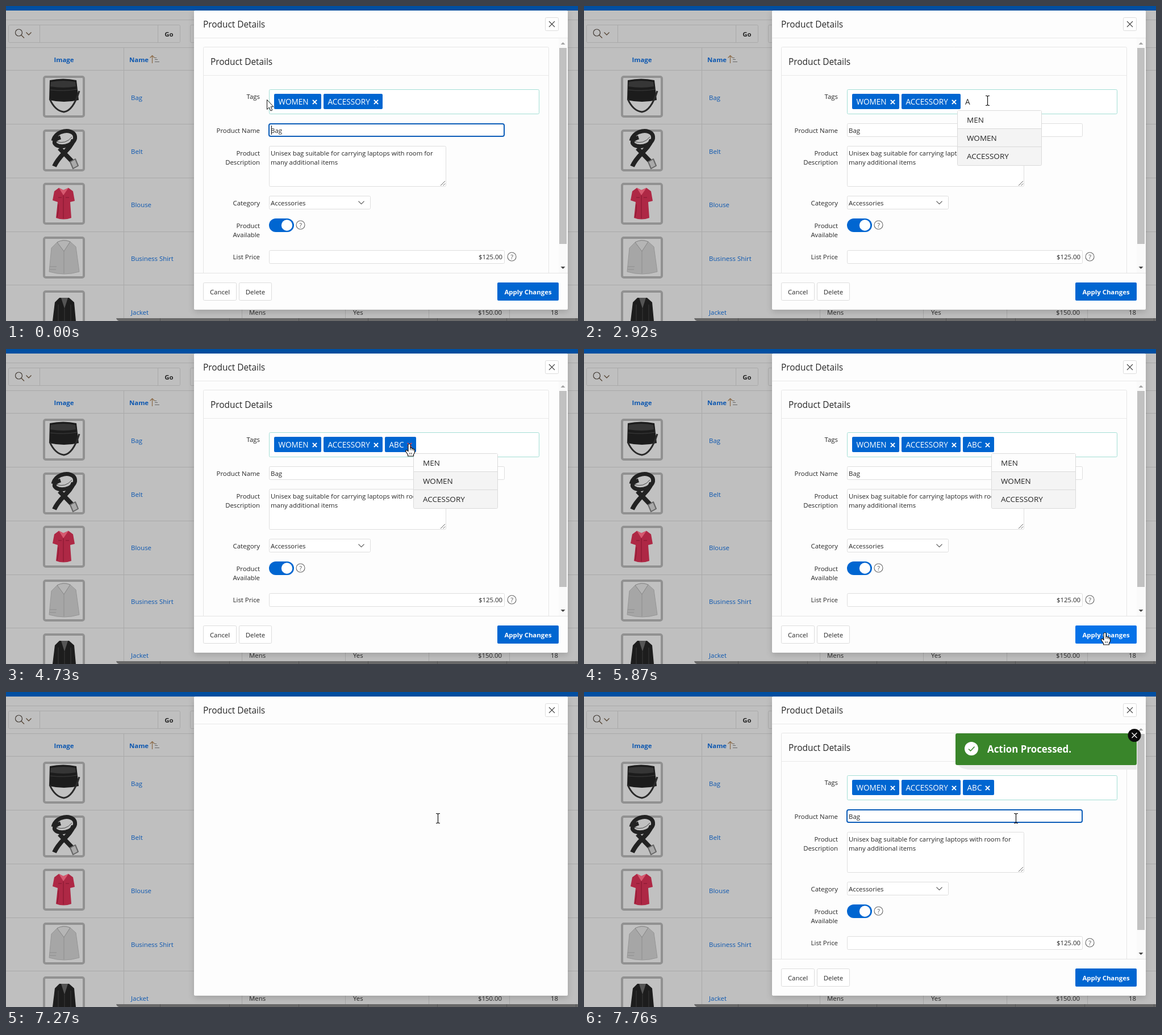
Write an HTML page with a canvas that moves like this. It is 1007x556 px and loops after 8 s.

```html
<!DOCTYPE html>
<html lang="en">
<head>
<meta charset="utf-8">
<title>Product Details</title>
<style>
html, body { margin: 0; width: 100%; height: 100%; overflow: hidden; background: #bfbfbf; }
canvas { display: block; }
</style>
</head>
<body>
<canvas id="stage" width="1007" height="556"></canvas>
<script>
const ctx = document.getElementById('stage').getContext('2d');
const LOOP = 8000;
const BLUE = '#0066d1', INK = '#262626', LINK = '#0c57b0', RULE = '#a9a9a9', PAPER = '#fdfdfd';
const TAGS = [
  { text: 'WOMEN', x: 472, w: 83 },
  { text: 'ACCESSORY', x: 559, w: 104 },
  { text: 'ABC', x: 667, w: 55 }
];

// Helpers
function label(s, x, y, { size = 11.4, weight = 400, color = INK, align = 'left' } = {}) {
  ctx.font = `${weight} ${size}px "Open Sans", "Noto Sans", sans-serif`;
  ctx.fillStyle = color;
  ctx.textAlign = align;
  ctx.fillText(s, x, y);
}

function rect(x, y, w, h, color) {
  ctx.fillStyle = color;
  ctx.fillRect(x, y, w, h);
}

function box(x, y, w, h, fill, stroke, r = 2, line = 1) {
  ctx.beginPath();
  const i = stroke ? line / 2 : 0;
  ctx.roundRect(x + i, y + i, w - 2 * i, h - 2 * i, r);
  if (fill) { ctx.fillStyle = fill; ctx.fill(); }
  if (stroke) { ctx.strokeStyle = stroke; ctx.lineWidth = line; ctx.stroke(); }
}

function path(d, fill, stroke, line = 1, x = 0, y = 0) {
  const p = new Path2D(d);
  ctx.save();
  ctx.translate(x, y);
  ctx.lineJoin = 'round';
  if (fill) { ctx.fillStyle = fill; ctx.fill(p); }
  if (stroke) { ctx.strokeStyle = stroke; ctx.lineWidth = line; ctx.stroke(p); }
  ctx.restore();
}

function disc(x, y, r, fill, stroke, line = 1) {
  ctx.beginPath();
  ctx.arc(x, y, r, 0, 2 * Math.PI);
  if (fill) { ctx.fillStyle = fill; ctx.fill(); }
  if (stroke) { ctx.strokeStyle = stroke; ctx.lineWidth = line; ctx.stroke(); }
}

function cross(x, y, r, color, line) {
  path(`M${-r} ${-r}L${r} ${r}M${r} ${-r}L${-r} ${r}`, null, color, line, x, y);
}

// Dimmed page behind the dialog
const thumbs = {
  bag() {
    path('M77 131Q101 126 124 131L128 166Q102 172 76 166Z', '#1c1c1c');
    path('M79 134Q101 130 122 134L123 142Q101 146 78 142Z', '#363636');
    path('M78 148Q102 151 125 147', null, '#3f3f3f', 1);
    path('M77 164Q86 185 102 187Q118 185 129 150', null, '#2a2a2a', 3);
  },
  belt() {
    path('M83 238C88 218 116 216 121 228C126 243 100 253 88 245C82 241 86 235 96 232', null, '#222', 7);
    path('M119 236C113 254 94 262 85 283M94 251L119 277', null, '#222', 8);
    path('M88 239Q105 245 116 231', null, '#4a4a4a', 1);
    path('M113 275L122 270L127 282L118 287Z', '#aaa', '#666', 2);
  },
  blouse() {
    path('M93 321L101 325L110 321L118 327L121 344L113 346L115 374Q101 379 88 374L91 346L82 343L85 327Z', '#ae2845');
    path('M93 321L101 334L110 321L101 325Z', '#d65a70');
    path('M101 334V375M92 338H98M105 338H111M92 350Q93 362 90 373', null, '#81172f', 1);
  },
  shirt() {
    path('M90 417Q101 411 113 416L123 425L129 469Q103 477 76 469L80 427Z', '#a6a6a6', '#969696', 1);
    path('M90 417L102 433L113 416Q101 411 90 417Z', '#b5b5b5', '#858585', 1);
    path('M102 433V472M77 460H89M77 465H88', null, '#8d8d8d', 1);
  },
  jacket() {
    path('M94 515H111L120 523L123 556H82L86 523Z', '#1d1d1d');
    path('M97 515L103 534L109 515Z', '#555');
    path('M92 527V556M103 534V556M114 527V556', null, '#3a3a3a', 1);
  }
};

function drawPage() {
  rect(0, 0, 1007, 556, '#bfbfbf');
  rect(0, 0, 1007, 8, '#004fa1');
  for (const y of [24, 73, 113, 208, 303, 398, 492]) rect(0, y, 1007, 1, RULE);
  rect(207, 73, 1, 483, RULE);
  for (const x of [415, 597, 744, 886]) rect(x, 114, 1, 442, RULE);

  box(4, 33, 303, 32, null, RULE);
  rect(59, 33, 1, 32, RULE);
  rect(267, 33, 1, 32, RULE);
  box(324, 33, 60, 32, null, RULE);
  disc(22.5, 47, 6, null, '#443d37', 1.2);
  path('M27 51.5L32 56.5M35.5 46.5L40 51L44.5 46.5', null, '#574635', 1.3);
  label('Go', 287, 54, { weight: 700, align: 'center' });

  label('Image', 102, 99, { weight: 700, color: LINK, align: 'center' });
  label('Name', 217, 99, { weight: 700, color: LINK });
  path('M257.5 101V87.5M253.5 91.5L257.5 87.5L261.5 91.5', null, '#8b6a46', 1.2);
  path('M262 91.5H265M262 94.5H267M262 98.5H270', null, '#666', 1);

  ['Bag', 'Belt', 'Blouse', 'Business Shirt', 'Jacket'].forEach((name, i) => {
    const top = Math.round(123 + 94.7 * i);
    box(65, top, 74, 74, '#c1c1c1', '#919191', 3, 4);
    label(name, 220, top + 43, { color: LINK });
  });
  Object.values(thumbs).forEach(draw => draw());

  label('Mens', 428, 545);
  label('Yes', 611, 545);
  label('$150.00', 873, 545, { align: 'right' });
  label('18', 972, 545, { align: 'right' });
  path('M194 551H1007V556H199Q195 555 194 551Z', '#696969');
  for (let x = 271; x < 1007; x += 122) rect(x, 551, 1, 5, '#555');
}

// Dialog
function drawShell() {
  ctx.save();
  ctx.shadowColor = 'rgba(0,0,0,.16)';
  ctx.shadowBlur = 12;
  ctx.shadowOffsetY = 4;
  box(331, 8, 658, 528, PAPER);
  ctx.restore();
  label('Product Details', 347, 38, { size: 15.4, weight: 500 });
  rect(331, 56, 658, 1, '#e9e9e9');
  box(949, 20, 24, 24, '#fff', '#dcdcdc');
  cross(961, 32, 5, '#444', 1.1);
}

function help(x, y) {
  disc(x, y, 7.5, null, '#666', 1.1);
  label('?', x, y + 4, { size: 11, color: '#555', align: 'center' });
}

function drawTag({ text, x, w }, hovered) {
  box(x, 155, w, 27, BLUE);
  label(text, x + 7.5, 173.5, { size: 13.6, color: '#fff' });
  cross(x + w - 11.5, 169.5, 3.6, hovered ? '#d8434f' : '#fff', 2);
}

function drawForm(s) {
  ctx.save();
  ctx.beginPath();
  ctx.rect(331, 57, 658, 414);
  ctx.clip();
  box(347, 72, 609, 420, PAPER, '#e6e6e6');
  label('Product Details', 360, 104, { size: 15.4, weight: 500 });
  rect(348, 122, 607, 1, '#e9e9e9');

  const captions = [['Tags', 164], ['Product Name', 224], ['Product', 264], ['Description', 280],
    ['Category', 352], ['Product', 392], ['Available', 408], ['List Price', 447]];
  for (const [text, y] of captions) label(text, 447, y, { align: 'right' });

  box(463, 147, 476, 44, '#fff', '#a3dfd5');
  TAGS.slice(0, s.tagCount).forEach(tag => drawTag(tag, s.hover === tag));

  if (s.nameFocus) box(462, 207, 416, 24, '#fff', '#0a5cb8', 3, 2);
  else box(463, 207, 415, 24, '#fff', '#dedede');
  label('Bag', 466, 224);

  box(463, 247, 312, 72, '#fff', '#dedede');
  label('Unisex bag suitable for carrying laptops with room for', 466, 264);
  label('many additional items', 466, 280);
  path('M765 317L773 309M769.5 317L773 313.5', null, '#666', 1);

  box(463, 335, 179, 24, '#fff', '#dedede');
  label('Accessories', 466, 352);
  path('M620.5 344.5L625.5 349.5L630.5 344.5', null, '#666', 1.1);

  box(463, 375, 44, 24, BLUE, null, 12);
  disc(494.5, 387, 9.7, '#fff');
  help(518.5, 386.5);

  box(463, 431, 415, 24, '#fff', '#dedede');
  label('$125.00', 874, 447, { align: 'right' });
  help(890.5, 442.5);

  rect(973, 57, 16, 414, '#fafafa');
  rect(974, 74, 13, 346, '#c1c1c1');
  path('M976.5 68L980.5 64L984.5 68Z', '#a3a3a3');
  path('M976.5 460L980.5 464L984.5 460Z', '#454545');
  ctx.restore();

  rect(331, 471, 658, 1, '#e4e4e4');
  box(347, 488, 59, 32, '#fff', '#dcdcdc');
  label('Cancel', 376.5, 509, { align: 'center' });
  box(410, 488, 58, 32, '#fff', '#dcdcdc');
  label('Delete', 439, 509, { align: 'center' });
  box(865, 488, 108, 32, s.buttonColor);
  label('Apply Changes', 919, 509, { weight: 700, color: '#fff', align: 'center' });
}

function drawTyping(s) {
  const start = s.tagCount === 3 ? 730 : 671;
  label(s.typed, start, 173.5, { size: 13.6 });
  if (s.tagCaret) rect(start + Math.round(ctx.measureText(s.typed).width), 159, 1, 19, '#111');
  if (s.nameCaret) rect(467, 211, 1, 16, '#111');
}

function drawMenu(x, height) {
  ctx.save();
  ctx.beginPath();
  ctx.rect(x, 184, 149, height);
  ctx.clip();
  box(x, 184, 149, height, '#f4f4f4', '#dadada');
  rect(x + 1, 185, 147, 32, PAPER);
  ['MEN', 'WOMEN', 'ACCESSORY'].forEach((item, i) => {
    if (i) rect(x, 184 + 32 * i, 149, 1, '#dadada');
    label(item, x + 17, 206 + 32 * i, { size: 13.5 });
  });
  ctx.restore();
}

function drawAlert() {
  path('M658 128H973V137H680Q662 136 658 128Z', '#ececec');
  box(654, 73, 319, 56, '#39852a', null, 3);
  disc(682, 100, 12, '#fff');
  path('M677 100.5L680.5 104L687.5 96.5', null, '#39852a', 1.5);
  label('Action Processed.', 710, 107, { size: 16.9, weight: 700, color: '#fff' });
  disc(969, 76.5, 11.5, '#0b0b0b');
  cross(969, 76.5, 4.5, '#fff', 1.3);
}

// Pointer
const SHAPES = {
  arrow: (x, y) => path('M.5 .5V17.5L4.3 14L7 20L9.8 18.8L7.2 12.8H12Z', '#fff', '#111', 1, x, y),
  text: (x, y) => {
    path('M-3 -8.5H-1L.5 -7.5L2 -8.5H4M.5 -7.5V7.5M-3 8.5H-1L.5 7.5L2 8.5H4', null, '#111', 1.2, x, y);
  },
  hand: (x, y) => {
    path('M-2 2Q0 -1 2 2V8Q4 6 5 9Q7 7.5 7.5 10Q9.5 9 9.5 12V16L7.5 19V22H-2.5V19.5L-6.5 13.5Q-6 10.5 -3.5 12L-2 13.5Z',
      '#fff', '#111', 1.2, x, y);
    path('M2 8V11.5M5 9V12M7.5 10V12.5M1 16V19M4 16V19', null, '#111', .9, x, y);
  }
};

const ROUTE = [[0, 459, 165], [120, 542, 167], [270, 638, 167], [400, 697, 167], [520, 710, 167],
  ...[4990, 5110, 5240, 5370, 5490, 5620, 5740].map((t, i) => {
    const u = (i + 1) / 7, k = u * u * (3 - 2 * u);
    return [t, Math.round(709 + 208 * k), Math.round(166 + 334 * k)];
  }),
  [6290, 888, 452], [6410, 805, 305], [6530, 760, 223]];

const inside = (x, y, l, t, r, b) => x >= l && x <= r && y >= t && y <= b;

function pointer(t, s) {
  const [, x, y] = ROUTE.findLast(p => p[0] <= t);
  s.hover = TAGS.slice(0, s.tagCount).find(g => inside(x, y, g.x + g.w - 18, 160, g.x + g.w - 5, 178));
  const onMenu = s.menuHeight && inside(x, y, s.menuX, 184, s.menuX + 149, 281);
  const onField = [[463, 147, 939, 191], [463, 207, 878, 231], [463, 247, 775, 319], [463, 431, 878, 455]]
    .some(f => inside(x, y, ...f));
  let shape = 'arrow';
  if (s.blank) shape = t >= 7270 ? 'text' : 'arrow';
  else if (s.hover || inside(x, y, 865, 488, 973, 520)) shape = 'hand';
  else if (onField && !onMenu) shape = 'text';
  return { shape, x, y };
}

// Scene state at a time
function stateAt(t) {
  const during = (a, b) => t >= a && t < b;
  const anyOf = spans => spans.some(([a, b]) => during(a, b));
  const s = {
    blank: during(6410, 7390),
    alert: t >= 7510,
    tagCount: t < 4220 ? 2 : 3,
    typed: during(2400, 4220) ? 'ABC'.slice(0, 1 + (t >= 3050) + (t >= 3420)) : '',
    nameFocus: t < 650 || t >= 7390,
    nameCaret: t < 650 || during(7390, 7760),
    tagCaret: anyOf([[650, 1220], [1730, 2280], [2400, 2920], [3050, 3930], [4220, 4730], [5240, 5740]]),
    menuX: t < 4220 ? 657 : 717,
    menuHeight: anyOf([[950, 4220], [4470, 6020]]) ? 98 : anyOf([[800, 950], [4350, 4470]]) ? 20 : 0,
    buttonColor: during(6020, 6140) ? '#005bbd' : during(5870, 6290) ? '#0572e8' : BLUE
  };
  s.pointer = pointer(t, s);
  return s;
}

function render(t) {
  const s = stateAt(t);
  drawPage();
  drawShell();
  if (!s.blank) {
    drawForm(s);
    drawTyping(s);
    if (s.menuHeight) drawMenu(s.menuX, s.menuHeight);
    if (s.alert) drawAlert();
  }
  SHAPES[s.pointer.shape](s.pointer.x, s.pointer.y);
}

const start = performance.now();
function tick() {
  render((performance.now() - start) % LOOP);
  requestAnimationFrame(tick);
}
tick();
</script>
</body>
</html>
```
